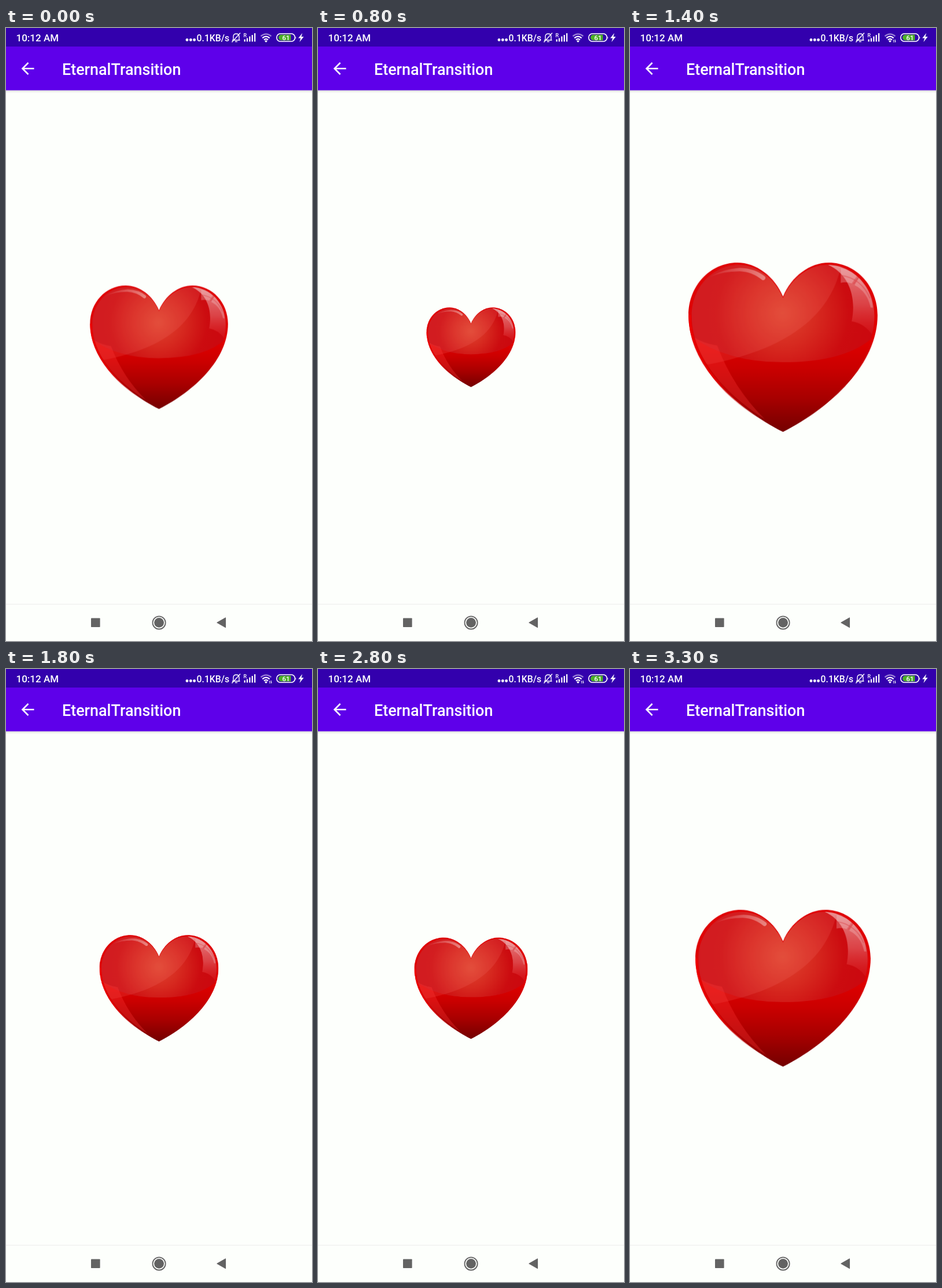
Animation, 529 px wide and 1058 px high, one loop 3400 ms. Source, as an HTML page:

```html
<!DOCTYPE html>
<html lang="en">
<head>
<meta charset="utf-8">
<title>Beating heart</title>
<style>
  html, body { margin: 0; width: 100%; height: 100%; overflow: hidden; background: #fdfffc; }
  svg { display: block; width: 100%; height: 100%; }
  text { font-family: Roboto, "Open Sans", sans-serif; font-weight: 500; fill: #fff; }
  .line { fill: none; stroke: #fff; }

  .heart {
    transform-box: view-box;
    transform-origin: 264.5px 551px;
    animation: beat 3400ms infinite;
  }
  .data { animation: data 3400ms steps(1) infinite; }

  /* slow around the small size, sharp turn at the large one */
  @keyframes beat {
    0%      { transform: scale(.726); animation-timing-function: cubic-bezier(.273, .488, .644, 1); }
    15.294% { transform: scale(.392); animation-timing-function: cubic-bezier(.48, 0, 1, 1); }
    41.765% { transform: scale(1.018); animation-timing-function: cubic-bezier(0, 0, .52, 1); }
    68.235% { transform: scale(.392); animation-timing-function: cubic-bezier(.48, 0, 1, 1); }
    94.706% { transform: scale(1.018); animation-timing-function: linear; }
    100%    { transform: scale(.802); }
  }
  @keyframes data {
    0%      { opacity: 0; }
    38.235% { opacity: 1; }
    100%    { opacity: 1; }
  }
</style>
</head>
<body>
<svg viewBox="0 0 529 1058" preserveAspectRatio="none">
  <defs>
    <path id="shape" d="M264.5 463C250 428 218 404 185 404C137 404 100 445 100 495C100 580 180 655 264.5 698C349 655 429 580 429 495C429 445 392 404 344 404C311 404 279 428 264.5 463Z"/>
    <clipPath id="inner">
      <use href="#shape" transform="translate(264.5 548) scale(.967 .973) translate(-264.5 -548)"/>
    </clipPath>
    <linearGradient id="body" gradientUnits="userSpaceOnUse" x1="0" y1="404" x2="0" y2="698">
      <stop offset="0" stop-color="#df0508"/>
      <stop offset=".45" stop-color="#e00000"/>
      <stop offset=".62" stop-color="#cb0000"/>
      <stop offset=".8" stop-color="#a80000"/>
      <stop offset="1" stop-color="#740000"/>
    </linearGradient>
    <radialGradient id="glow" gradientUnits="userSpaceOnUse" cx="264" cy="492" r="165">
      <stop offset="0" stop-color="#df4530"/>
      <stop offset=".35" stop-color="#d72a20"/>
      <stop offset=".7" stop-color="#cc0c10"/>
      <stop offset="1" stop-color="#cb080f"/>
    </radialGradient>
    <linearGradient id="shine" gradientUnits="userSpaceOnUse" x1="400" y1="410" x2="398" y2="530">
      <stop offset="0" stop-color="#fff" stop-opacity=".5"/>
      <stop offset=".55" stop-color="#fbb" stop-opacity=".32"/>
      <stop offset="1" stop-color="#f44" stop-opacity=".12"/>
    </linearGradient>
    <linearGradient id="streak" gradientUnits="userSpaceOnUse" x1="138" y1="0" x2="232" y2="0">
      <stop offset="0" stop-color="#fff" stop-opacity=".05"/>
      <stop offset="1" stop-color="#fff" stop-opacity=".4"/>
    </linearGradient>
    <linearGradient id="edge" gradientUnits="userSpaceOnUse" x1="0" y1="495" x2="0" y2="675">
      <stop offset="0" stop-color="#f00000"/>
      <stop offset=".6" stop-color="#e00000"/>
      <stop offset="1" stop-color="#b00000" stop-opacity="0"/>
    </linearGradient>
    <linearGradient id="shadow" x1="0" y1="0" x2="0" y2="1">
      <stop offset="0" stop-color="#000" stop-opacity=".14"/>
      <stop offset="1" stop-color="#000" stop-opacity="0"/>
    </linearGradient>
  </defs>

  <rect width="529" height="1058" fill="#fdfffc"/>

  <!-- heart -->
  <g class="heart">
    <use href="#shape" fill="url(#body)"/>
    <path d="M102 495C102 575 172 645 240 683" fill="none" stroke="url(#edge)" stroke-width="4"/>
    <g clip-path="url(#inner)">
      <path d="M95 395H435V519Q390 577 264 577Q160 577 95 525Z" fill="url(#glow)"/>
      <path d="M95 395H368C357 478 296 550 134 581L95 560Z" fill="#f67a78" fill-opacity=".16"/>
      <path d="M110 534Q128 545 150 548Q178 622 233 676C165 640 118 580 110 534Z" fill="#ff3838" fill-opacity=".3"/>
      <path d="M338 406C378 420 393 462 384 506Q407 510 420 530C432 500 432 455 410 428C392 408 365 402 338 406Z" fill="url(#shine)"/>
      <g fill="#fff" fill-opacity=".22">
        <path d="M365 413Q381 417 393 427L384 440Q375 437 365 439Z"/>
        <path d="M397 430Q417 447 421 482H417Q411 454 389 443Z"/>
      </g>
      <path d="M365 426Q401 431 416 466M401 423L387 441" fill="none" stroke="#d8383c" stroke-opacity=".4" stroke-width="2"/>
    </g>
    <path d="M137 429Q160 415 190 413Q216 414 233 428A4 4 0 0 1 228 434Q211 420 189 419Q160 419 137 429Z" fill="url(#streak)"/>
  </g>

  <!-- bars -->
  <rect y="107" width="529" height="5" fill="url(#shadow)"/>
  <rect y="31" width="529" height="76.5" fill="#5e00ea"/>
  <rect width="529" height="32" fill="#3300ad"/>
  <path class="line" d="M48.5 70H29M38.5 60L28.5 70L38.5 80" stroke-width="2.6"/>
  <text x="97" y="81" font-size="26.9">EternalTransition</text>

  <!-- status -->
  <text x="17.5" y="22.5" font-size="17">10:12 AM</text>
  <g fill="#fff">
    <circle cx="313" cy="20.5" r="2.4"/>
    <circle cx="319.3" cy="20.5" r="2.4"/>
    <circle cx="325.6" cy="20.5" r="2.4"/>
  </g>
  <text x="329.5" y="22.5" font-size="15.8">0.1KB/s</text>
  <path class="line" stroke-width="1.4" d="M391 21H404.5M393 20.5V15Q393 10 398 10Q403 10 403 15V20.5M396 23.5H400M390.5 24.5L405 8.5"/>
  <text x="410.5" y="15.8" font-size="9" font-weight="700">R</text>
  <path class="line" stroke-width="2.2" d="M412.7 23.5V19.5M417 23.5V17.5M421.4 23.5V14.5M425.8 23.5V12M430.2 23.5V9"/>
  <g class="line" stroke-width="2.2">
    <path d="M440.5 14.2Q449.5 6.5 458.5 14.2" stroke-opacity=".5"/>
    <path d="M443.3 17.3Q449.5 12 455.7 17.3"/>
    <path d="M446 20.3Q449.5 17.4 453 20.3"/>
  </g>
  <path d="M447 22.2Q449.5 20.4 452 22.2L449.5 25Z" fill="#fff"/>
  <path class="line data" stroke-width="1" d="M456 25V20.5L455 21.7M458.5 20V24.5L459.5 23.3"/>
  <rect class="line" x="468" y="9.7" width="31.5" height="13.6" rx="6.4" stroke-width="1.6"/>
  <path d="M476 11.5H492.5V21.5H476A5 5 0 0 1 476 11.5Z" fill="#4cae28"/>
  <path d="M500.5 14Q502.3 16.5 500.5 19Z" fill="#fff"/>
  <text x="484" y="20.6" font-size="11.5" font-weight="700" text-anchor="middle">61</text>
  <path d="M512.3 8.8L505.3 17.4H509.4L507.4 24.2L514.7 15H510.5Z" fill="#fff"/>

  <!-- navigation -->
  <rect y="994" width="529" height="1" fill="#ececec"/>
  <g fill="#636363">
    <rect x="147" y="1018.5" width="15.6" height="15.6" rx=".8"/>
    <circle cx="264.6" cy="1026.4" r="8.4"/>
    <circle cx="264.6" cy="1026.4" r="11.1" fill="none" stroke="#636363" stroke-width="1.8"/>
    <path d="M365 1026.3L379.5 1018V1034.6Z" stroke="#636363" stroke-width="1.2" stroke-linejoin="round"/>
  </g>
</svg>
</body>
</html>
```
